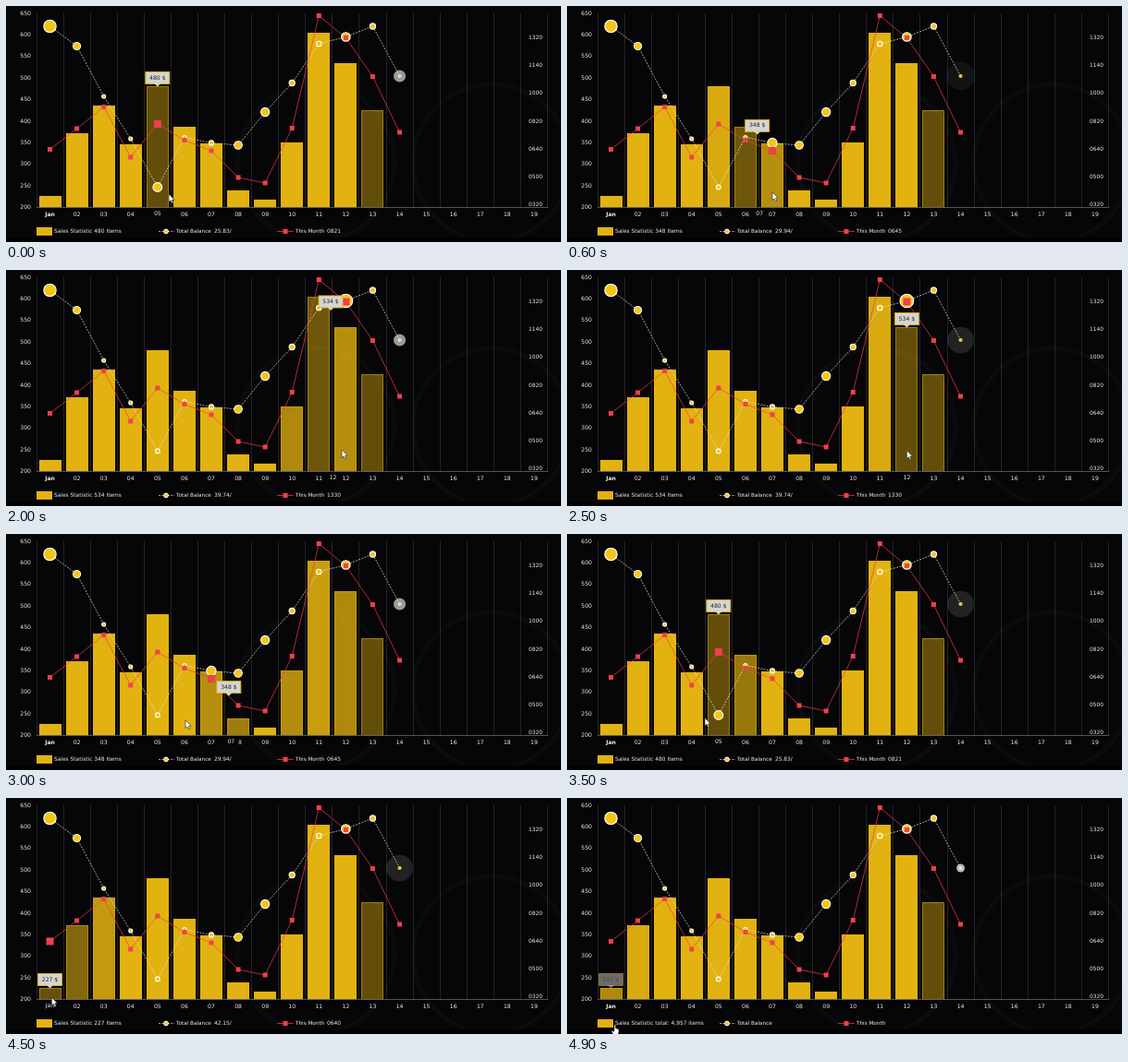
Animation, 600 px wide and 256 px high, one loop 5 s. Source, as an HTML page with a canvas:

```html
<!DOCTYPE html>
<html lang="en">
<head>
<meta charset="utf-8">
<title>Sales chart</title>
<style>
html, body { margin: 0; height: 100%; overflow: hidden; background: #000; }
canvas { display: block; }
</style>
</head>
<body>
<canvas id="stage" width="600" height="256"></canvas>
<script>
const c = document.getElementById('stage').getContext('2d');
const LOOP = 5000, STEP = 100, PITCH = 29.08, BASE = 218.5;
const GOLD = '#e2b210', DOT = '#f6c415', RED = '#f0404c', INK = '#060507';
const FONT = '"DejaVu Sans", Verdana, sans-serif';

// Chart data per day: sales, balance, this month, balance height and radius, month height
const days = [
  [227, 42.15, 640, 22, 6.7, 155.5], [371, 38.89, 802, 43.5, 4, 133],
  [435, 33.72, 915, 98, 2, 109.5], [346, 29.95, 598, 144, 2, 164],
  [480, 25.83, 821, 196.5, 2.4, 128], [387, 29.90, 700, 142.5, 2, 145.5],
  [348, 29.94, 645, 148.5, 2.6, 157], [239, 29.71, 500, 151, 4.3, 186],
  [219, 32.35, 470, 115, 4.6, 192], [349, 35.49, 805, 83.5, 3.1, 132.5],
  [604, 39.02, 1450, 41, 2.8, 10.5], [534, 39.74, 1330, 33.5, 4.8, 34.5],
  [425, 40.10, 1090, 22, 3.1, 76.5],
].map(([sales, balance, month, by, br, my]) => ({ sales, balance, month, by, br, my }));
const last = { by: 76, my: 137 };

// Pointer path: time, x, y
const path = [[0, 176, 204], [500, 206, 203], [600, 222, 202], [1250, 262, 201], [1350, 302, 201],
  [1950, 355, 196], [2000, 363, 195], [2580, 368, 196], [3000, 194, 202], [3800, 122, 198],
  [4100, 77, 196], [4400, 49, 209], [4900, 51, 246]];

const clamp = v => Math.max(0, Math.min(1, v));
const smooth = u => u * u * (3 - 2 * u);
const mix = (a, b, u) => a + (b - a) * u;
const colX = i => 47.5 + PITCH * i;
const barY = i => Math.round(BASE - (days[i].sales - 200) * 0.47);
const pad = (n, size) => String(n).padStart(size, '0');
const dayName = i => i ? pad(i + 1, 2) : 'Jan';

function pointer(t) {
  const i = Math.max(1, path.findIndex(p => p[0] >= t));
  const a = path[i - 1], b = path[i], u = (t - a[0]) / (b[0] - a[0]);
  return [mix(a[1], b[1], u), mix(a[2], b[2], u)];
}

function columnAt(t) {
  const [x, y] = pointer(t);
  return y > 219 ? -1 : Math.round((x - colX(0)) / PITCH);
}

// Replays the hover up to t; the pointer is polled once per step
function hoverState(t) {
  const s = { dim: days.map((_, i) => +(i === 4)), x: colX(4), y: barY(4) - 9, col: 4, tip: 4, gone: 0 };
  let from = s, since = -STEP;
  for (let poll = 45; poll <= t; poll += STEP) {
    const col = columnAt(poll), end = Math.min(t, poll + STEP);
    if (col !== s.col) {
      from = { ...s };
      since = poll;
      s.col = col;
      if (col >= 0) s.tip = col;
    }
    s.dim = s.dim.map((k, i) => clamp(k + (end - poll) * (i === col ? 1 / 160 : -1 / 600)));
    const u = smooth(clamp((end - since) / 120));
    s.x = mix(from.x, colX(s.tip), u);
    s.y = mix(from.y, barY(s.tip) - 9, u);
    s.gone = col < 0 ? end - since : 0;
  }
  return s;
}

function text(s, x, y, align = 'left', size = 5.9, color = '#eee', weight = '') {
  c.font = `${weight} ${size}px ${FONT}`;
  c.textAlign = align;
  c.textBaseline = 'middle';
  c.fillStyle = color;
  c.fillText(s, x, y);
}

function line(points, color, width = 0.7, dash = []) {
  c.beginPath();
  points.forEach(p => c.lineTo(...p));
  c.strokeStyle = color;
  c.lineWidth = width;
  c.setLineDash(dash);
  c.stroke();
  c.setLineDash([]);
}

function disc(x, y, r, fill, stroke, width = 1) {
  c.beginPath();
  c.arc(x, y, r, 0, 7);
  if (fill) { c.fillStyle = fill; c.fill(); }
  if (stroke) { c.strokeStyle = stroke; c.lineWidth = width; c.stroke(); }
}

function square(x, y, size) {
  c.fillStyle = RED;
  c.fillRect(x - size / 2, y - size / 2, size, size);
}

function shape(points, fill, stroke) {
  c.beginPath();
  points.forEach(p => c.lineTo(...p));
  c.closePath();
  c.fillStyle = fill;
  c.fill();
  if (stroke) { c.strokeStyle = stroke; c.lineWidth = 0.6; c.stroke(); }
}

function backdrop() {
  c.fillStyle = INK;
  c.fillRect(0, 0, 600, 256);
  for (const x of [335, 525]) disc(x, 170, 85, null, 'rgba(255,255,255,.018)', 5);
  c.fillStyle = '#000';
  c.fillRect(0, 251, 600, 5);
  for (let i = 0; i < 20; i++) {
    const x = Math.floor(33 + PITCH * i) + 0.5;
    line([[x, 8], [x, BASE]], 'rgba(255,255,255,.12)', 1);
  }
}

function axes() {
  line([[33, BASE], [586, BASE]], '#666', 0.8);
  for (let i = 0; i < 10; i++) text(650 - 50 * i, 27, 8 + 23.4 * i, 'right', 6.1);
  // Uneven scale: steps of 180, 140, 180
  for (let i = 0; i < 7; i++)
    text(pad(1320 - 500 * Math.floor(i / 3) - [0, 180, 320][i % 3], 4), 580, 34.5 + 30.2 * i, 'right');
  for (let i = 0; i < 19; i++)
    text(dayName(i), colX(i), 226, 'center', 6.1, '#eee', i ? '' : 'bold');
}

function bars(dim) {
  days.forEach((_, i) => {
    const x = Math.round(colX(i) - 12), y = barY(i), forecast = i === days.length - 1;
    c.globalAlpha = 1 - 0.58 * (forecast ? 1 : dim[i]);
    c.fillStyle = GOLD;
    c.fillRect(x, y, 24, BASE - y);
    c.globalAlpha = 0.45;
    c.strokeStyle = GOLD;
    c.lineWidth = 1;
    c.strokeRect(x + 0.5, y + 0.5, 23, BASE - y - 0.5);
    c.globalAlpha = 1;
  });
}

function lines(col, t) {
  const all = [...days, last];
  line(all.map((d, i) => [colX(i), d.by]), '#e8e8e0', 0.7, [2, 1.3]);
  line(all.map((d, i) => [colX(i), d.my]), RED);
  days.forEach((d, i) =>
    disc(colX(i), d.by, d.br + (i && i === col ? 2.5 : 0), DOT, '#fff', 1.1));
  all.forEach((d, i) => square(colX(i), d.my, i === col ? 8 : 5));

  const q = (t / 1000 + 0.25) % 1, x = colX(13);
  disc(x, last.by, 2.1, DOT);
  disc(x, last.by, 1 + 15 * (1 - (1 - q) ** 1.6), `rgba(235,235,235,${(1 - q) ** 1.5})`);
}

function legend(day) {
  c.fillStyle = GOLD;
  c.fillRect(33, 240, 17, 9);
  text('Sales Statistic ' + (day ? day.sales + ' Items' : 'total: 4,957 items'), 52, 244.7);
  line([[165, 244.5], [182, 244.5]], '#ddd', 0.7, [2, 1.3]);
  disc(173, 244.5, 2.4, DOT, '#fff');
  text('Total Balance', 184, 244.7, 'left', 5.7);
  line([[293, 244.5], [311, 244.5]], RED);
  square(302, 244.5, 5);
  text('This Month', 313, 244.7, 'left', 5.7);
  if (day) {
    text(day.balance.toFixed(2) + '/', 225, 244.7);
    text(pad(day.month, 4), 347, 244.7);
  }
}

function tooltip({ x, y, tip, gone }) {
  const lag = 2.5 * clamp(Math.abs(x - colX(tip)) / 8);
  c.globalAlpha = clamp(1 - gone / 300);
  c.fillStyle = INK;
  c.fillRect(x + lag - 8, 219.2, 16, 11);
  text(dayName(tip), x + lag, 225.5, 'center', 6.1);

  c.globalAlpha = clamp(1 - gone / 700);
  c.fillStyle = '#d6d5d0';
  c.fillRect(x - 13, y - 6.5, 26, 13);
  c.strokeStyle = GOLD;
  c.lineWidth = 0.9;
  c.strokeRect(x - 13, y - 6.5, 26, 13);
  shape([[x - 3.5, y + 6], [x + 3.5, y + 6], [x, y + 9.5]], '#d6d5d0');
  text(days[tip].sales + ' $', x, y, 'center', 6.1, '#222');
  c.globalAlpha = 1;
}

function cursor(t) {
  const arrow = [[0, 0], [0, 8.6], [2, 6.9], [3.4, 10], [4.9, 9.3], [3.5, 6.4], [6.1, 6.2]];
  const hand = [[0, 0], [1.5, 0], [1.7, 3.8], [5, 4.8], [5, 8], [4, 10.5], [-1, 10.5], [-3.4, 6.4], [0, 7.2]];
  const [x, y] = pointer(t);
  c.save();
  c.translate(x, y);
  shape(y > 239 ? hand : arrow, '#fff', '#222');
  c.restore();
}

function draw(now) {
  const t = Math.floor((now % LOOP) / STEP) * STEP;
  const state = hoverState(t);
  backdrop();
  bars(state.dim);
  axes();
  lines(state.col, t);
  legend(days[state.col]);
  tooltip(state);
  cursor(t);
}

let start;
function tick(now) {
  start ??= now;
  draw(now - start);
  requestAnimationFrame(tick);
}
draw(0);
requestAnimationFrame(tick);
</script>
</body>
</html>
```
